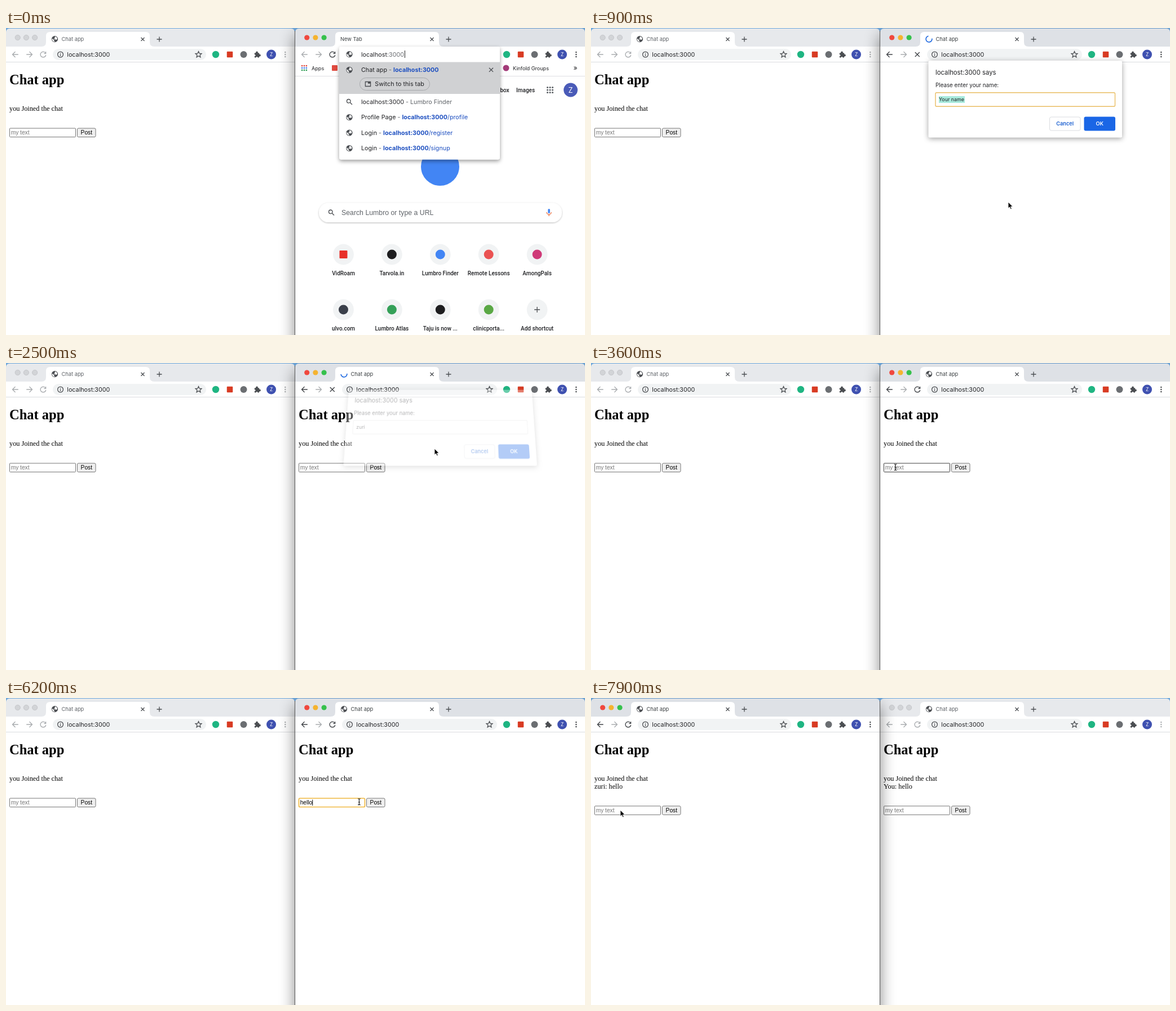
Recreate the animation shown at these times as an HTML page. Size 1027x545 px, loop 8000 ms.

```html
<!DOCTYPE html>
<html lang="en">
<head>
<meta charset="utf-8">
<title>Chat app</title>
<style>
html, body { margin: 0; width: 100%; height: 100%; overflow: hidden; background: #6fa8dc; }
svg { position: absolute; left: 0; top: 0; display: block; }
text { font-family: Inter, "Open Sans", sans-serif; fill: #202124; }
.serif { font: 12.26px "Liberation Serif", serif; fill: #000; }
.h1 { font-size: 24.5px; font-weight: 700; }
.form { font: 10.2px "Liberation Sans", sans-serif; fill: #000; }
.hint { fill: #757575; }
.tile { font: 500 10px Roboto, sans-serif; }
.query { font: 12.3px "Liberation Sans", sans-serif; fill: #5f6368; }
.url { font-size: 10.75px; }
.mark { font-size: 9.1px; }
.tab { font-size: 9.3px; fill: var(--title); }
.mid { text-anchor: middle; }
.win { --ink: #a7aaad; --strip: #e7e9ec; --title: #5f6368; --edge: #bfc1c4;
  --red: #d2d4d7; --yellow: #d2d4d7; --green: #d2d4d7; }
.win.on { --ink: #3f4246; --strip: #dee1e6; --title: #3c4043; --edge: none;
  --red: #f0483e; --yellow: #f5b32f; --green: #36c14c; }
.line { fill: none; stroke: #4a4d51; stroke-width: 1.3; }
.ink { stroke: var(--ink); }
.pale { stroke: #a9acaf; }
#dialog { left: 598px; top: 58px; overflow: visible; transform-origin: 50% 100%;
  filter: drop-shadow(0 2px 5px rgba(0,0,0,.38)); }
</style>
</head>
<body>
<svg id="stage" width="1027" height="545" viewBox="0 0 1027 545">
  <defs>
    <filter id="blur" filterUnits="userSpaceOnUse" x="-80" y="-80" width="1200" height="860">
      <feGaussianBlur stdDeviation="14"/>
    </filter>
    <filter id="soft" x="-10%" y="-20%" width="120%" height="150%">
      <feDropShadow dx="0" dy="1" stdDeviation="1.6" flood-opacity=".28"/>
    </filter>
    <filter id="lift" x="-10%" y="-10%" width="120%" height="125%">
      <feDropShadow dx="0" dy="3" stdDeviation="3.5" flood-opacity=".4"/>
    </filter>
    <g id="globe">
      <circle r="5.6" fill="#4a4d51"/>
      <path d="M-4.5-1.2l3 2.8v1.1l1.4 1v1A4.6 4.6 0 0 1-4.5-1.2zM.8-4.5q2.8.8 3.6 3.2l-.9 2.6-2.5-.6h-2.3V-.9h2l-1.1-1.5z" fill="#fff"/>
    </g>
    <g id="lens" class="line"><circle cx="-1.2" cy="-1.2" r="3.3"/><path d="M1.3 1.3L5 5"/></g>
  </defs>
  <rect id="shadow" y="14" width="513" height="720" opacity=".5" filter="url(#blur)"/>
  <path id="seam" d="M512.5 5V545" stroke="#555" fill="none"/>
</svg>
<svg id="dialog" width="344" height="137" viewBox="598 58 344 137"></svg>
<svg id="pointer" width="1027" height="545" viewBox="0 0 1027 545">
  <path id="arrow" d="M0 0V11.2L2.6 8.8 4.4 12.8 6.3 12 4.6 8.1H8.2Z" fill="#000" stroke="#fff" stroke-width=".9"/>
  <path id="beam" d="M-2.3-5.5Q0-5.5 0-4V4Q0 5.5-2.3 5.5M2.3-5.5Q0-5.5 0-4M0 4Q0 5.5 2.3 5.5M-1.3.8H1.3" fill="none" stroke="#111" stroke-width="1.1"/>
</svg>
<script>
const LOOP = 8000, STEP = 100, DX = 513;
const $ = id => document.getElementById(id);
const show = (el, on) => { el.style.display = on ? '' : 'none'; };
const set = (el, attrs) => { for (const k in attrs) el.setAttribute(k, attrs[k]); };
const clamp = v => Math.min(1, Math.max(0, v));
const span = (t, a, b) => clamp((t - a) / (b - a));
const smooth = p => p * p * (3 - 2 * p);
const shift = (x, y) => `matrix(1, 0, 0, 1, ${x}, ${y})`;

// Markup helpers
const text = (x, y, s, cls = '', extra = '') => `<text x="${x}" y="${y}" class="${cls}" ${extra}>${s}</text>`;
const icon = (x, y, d, cls = 'line', extra = '') => `<path transform="${shift(x, y)}" d="${d}" class="${cls}" ${extra}/>`;
const use = (x, y, id, extra = '') => `<use href="#${id}" x="${x}" y="${y}" ${extra}/>`;
const dot = (x, y, r, fill, extra = '') => `<circle cx="${x}" cy="${y}" r="${r}" fill="${fill}" ${extra}/>`;
const box = (x, y, w, h, fill, extra = '') => `<rect x="${x}" y="${y}" width="${w}" height="${h}" fill="${fill}" ${extra}/>`;
const chip = (x, y, s, fill) => box(x - s / 2, y - s / 2, s, s, fill, 'rx="1"');
const grid = (x, y, gap, r, fill) => [...Array(9)].map((_, i) =>
  dot(x + (i % 3 - 1) * gap, y + (Math.floor(i / 3) - 1) * gap, r, fill(i))).join('');

const CROSS = 'M-4-4L4 4M4-4L-4 4', PLUS = 'M-5 0H5M0-5V5';
const BACK = 'M5.3 0H-5M0-5L-5 0 0 5', FORWARD = 'M-5.3 0H5M0-5L5 0 0 5';
const RELOAD = 'M4-2.8A4.9 4.9 0 1 0 4.8 1M4.6-5V-1.6H1.2';
const STAR = 'M0-5.4L1.6-1.8 5.4-1.5 2.5 1 3.4 4.8 0 2.7-3.4 4.8-2.5 1-5.4-1.5-1.6-1.8Z';

function puzzle(x) {
  return `<g transform="${shift(x, 47)}" fill="#4a4d51">${box(-5.2, -2.8, 8.4, 8.4, '#4a4d51', 'rx="1"')}` +
    `<circle cx="-1" cy="-3.4" r="2"/><circle cx="3.8" cy="1.4" r="2"/>` +
    `${dot(-5, 1.4, 1.5, '#fff')}${dot(-1, 5.5, 1.5, '#fff')}</g>`;
}

function windowMarkup(key, w, s) {
  const lights = ['red', 'yellow', 'green'].map((c, i) =>
    dot(20.7 + i * 15.2, 17, 4.6, `var(--${c})`, 'stroke="var(--edge)" stroke-width=".8"')).join('');
  return box(0, 1, w, 570, 'var(--strip)', 'rx="6"') + lights +
    `<path d="M63 33q8 0 8-8V14q0-7 7-7h170q7 0 7 7v11q0 8 8 8z" fill="#fff"/>` +
    use(86.5, 19.6, 'globe', `id="${key}Icon"`) + text(98.5, 23, 'Chat app', 'tab', `id="${key}Title"`) +
    icon(242.5, 20, 'M-3-3L3 3M3-3L-3 3') + icon(272, 20, 'M-4.5 0H4.5M0-4.5V4.5') +
    box(0, 33, w, 520, '#fff') + box(0, 60, w, 1, '#d9dbde') +
    icon(16.5, 47, BACK, 'line ink', `id="${key}Back"`) + icon(41.5, 47, FORWARD, 'line pale') +
    icon(66, 47, RELOAD, 'line ink', `id="${key}Reload"`) + icon(65.8, 47, CROSS, 'line ink', `id="${key}Stop" style="display:none"`) +
    box(83, 37, 272 + s, 20, '#f1f3f4', 'rx="10"') +
    dot(96.5, 47, 4.9, 'none', 'class="line"') + icon(96.5, 47, 'M0-.6V2.7M0-2.7V-1.5') +
    text(108.3, 50.8, 'localhost:3000', 'url') + icon(341.5 + s, 47, STAR) +
    dot(372 + s, 47, 6.2, '#1fb582') + chip(397 + s, 47, 10.5, '#d83b23') + dot(421.5 + s, 47, 6, '#6b6e72') +
    puzzle(446 + s) + dot(470.5 + s, 47, 8.5, '#3f51b0') +
    text(470.5 + s, 50, 'Z', 'mid', 'font-size="8.3" style="fill:#fff"') +
    [-4, 0, 4].map(d => dot(495.3 + s, 47 + d, 1.2, 'var(--ink)')).join('') +
    `<g id="${key}Page">` + text(6, 99.5, 'Chat app', 'serif h1') + text(6, 147, 'you Joined the chat', 'serif') +
    text(6, 161, key === 'left' ? 'zuri: hello' : 'You: hello', 'serif', `id="${key}Note"`) +
    `<g id="${key}Form">` + box(6.5, 178, 117, 15.5, '#fff', `id="${key}Field" stroke="#767676" rx="1"`) +
    text(8.7, 189, 'my text', 'form hint', `id="${key}Value"`) +
    `<path id="${key}Caret" d="M0 180.5V191" stroke="#000" style="display:none"/>` +
    box(126.5, 178, 32.5, 15.5, '#efefef', 'stroke="#767676" rx="2"') + text(142.8, 189.2, 'Post', 'form mid') + '</g></g>';
}

// New tab page, in stage coordinates
function startPage() {
  const marks = [[583, 'Inbox', '#e04a3f'], [639, 'VidRoam', '#e8302a'], [707, 'Plans', '#34a058'],
    [761, 'Brief', '#3f7de8'], [816, 'Interpret', '#4a84ea'], [887, 'Kinfold Groups', '#a33a78']];
  const tiles = [['VidRoam', '#e8302a'], ['Tarvola.in', '#1d1d1f'], ['Lumbro Finder', '#4285f4'],
    ['Remote Lessons', '#ea5252'], ['AmongPals', '#cf3a78'], ['ulvo.com', '#3a3f4a'],
    ['Lumbro Atlas', '#34a058'], ['Taju is now ...', '#1d1d1f'], ['clinicporta...', '#5aa845'], ['Add shortcut', '']];
  const tone = i => ['#e2483d', '#4a84ea', '#34a058'][Math.floor(i / 3)];
  return box(513, 60, 514, 485, '#fff') + box(513, 85, 514, 1, '#dddfe2') +
    grid(529, 71, 3.9, 1.4, tone) + text(542, 74.5, 'Apps', 'mark') +
    marks.map(([x, s, c], i) => (i % 2 ? dot(x, 71, 5.5, c) : chip(x, 71, 10, c)) + text(x + 12, 74.5, s, 'mark')).join('') +
    text(1010, 75, '»', 'mid', 'font-size="12"') +
    text(868, 113.5, 'Inbox', 'tile') + text(905, 113.5, 'Images', 'tile') +
    grid(965, 110, 4.5, 1.6, () => '#5f6368') + dot(1001.5, 110, 12.4, '#4a5bb8') +
    text(1001.5, 114.5, 'Z', 'mid', 'font-size="12.5" style="fill:#fff"') +
    dot(770, 246, 34, '#4285f4') +
    box(555, 310.5, 431, 34.5, '#fff', 'rx="17.2" filter="url(#soft)"') + use(577, 327.5, 'lens') +
    text(595, 331.5, 'Search Lumbro or type a URL', 'query') +
    box(961.3, 321, 3.6, 8, '#4285f4', 'rx="1.8"') +
    icon(963.1, 327, 'M-4 0A4 4 0 0 0 4 0M0 4V7', 'line', 'style="stroke:#ea6a3a"') +
    tiles.map(([s, c], i) => {
      const x = 598.5 + (i % 5) * 85.9, y = i < 5 ? 402 : 500;
      return dot(x, y, 18.4, '#f1f3f4') + (c ? (i ? dot(x, y, 8.5, c) : chip(x, y, 14, c)) : icon(x, y, PLUS)) +
        text(x, y + 36.7, s, 'tile mid');
    }).join('');
}

function suggestions() {
  const blue = (s, w) => `<tspan fill="#1d4fc0" font-weight="${w}">${s}</tspan>`;
  const row = (y, name, path) => use(609, y, 'globe') +
    text(630, y + 3.8, `${name} <tspan fill="#5f6368">-</tspan> ${blue('localhost:3000', 700)}${blue(path, 400)}`, 'url');
  return box(591, 33, 285, 200.5, '#fff', 'rx="4" filter="url(#lift)"') + use(609, 46.6, 'globe') +
    text(630, 50.8, 'localhost<tspan fill="#6a6d71">:3000</tspan>', 'url') + box(707, 40, 1, 13, '#222') +
    box(591, 60.5, 285, 56.5, '#d0d1d3') + row(74.3, 'Chat app', '') +
    icon(860.5, 74.3, 'M-3.6-3.6L3.6 3.6M3.6-3.6L-3.6 3.6') +
    box(627.5, 88.5, 124, 22, 'none', 'rx="11" stroke="#a6a8ab"') +
    icon(642, 99.5, 'M-4.6-4H4.6V4H-4.6Z') + box(642, 95.5, 4.6, 3.2, '#4a4d51') + text(654.3, 103.3, 'Switch to this tab', 'url') +
    use(609, 131, 'lens') +
    text(630, 134.8, 'localhost:3000 <tspan fill="#5f6368">- Lumbro Finder</tspan>', 'url') +
    row(158.5, 'Profile Page', '/profile') + row(186, 'Login', '/register') + row(213.5, 'Login', '/signup');
}

function group(id, markup, attrs = {}) {
  const g = document.createElementNS('http://www.w3.org/2000/svg', 'g');
  g.id = id;
  set(g, attrs);
  g.innerHTML = markup;
  $('stage').append(g);
  return g;
}

const left = group('left', windowMarkup('left', 512, 0), { class: 'win' });
const right = group('right', windowMarkup('right', 514, 3) +
  '<path id="spinner" fill="none" stroke="#1a66e0" stroke-width="1.6"/>',
  { class: 'win', transform: shift(DX, 0) });
const tabPage = group('tabPage', startPage());
const menu = group('menu', suggestions());

$('dialog').innerHTML = box(598.5, 58, 343.5, 136.5, '#fff', 'rx="2.5"') +
  text(611, 82.5, 'localhost:3000 says', '', 'font-size="11.3"') +
  text(611, 104.7, 'Please enter your name:', '', 'font-size="9.8"') +
  box(611, 114.8, 318.5, 24.4, '#fff', 'id="nameBox" rx="2" stroke="#e9bd62" stroke-width="1.4"') +
  box(617, 121, 46, 12, '#a8eadc', 'id="picked"') + text(617, 130.2, '', '', 'id="name" font-size="8.9"') +
  box(813.5, 158, 54.5, 24, '#fff', 'rx="3" stroke="#dadce0"') +
  text(840.7, 173.3, 'Cancel', 'mid', 'font-size="9.2" font-weight="600" style="fill:#1a5fd0"') +
  box(874.5, 157.5, 55.5, 25, '#1a66e6', 'rx="3"') +
  text(902.2, 173.3, 'OK', 'mid', 'font-size="9.2" font-weight="600" style="fill:#fff"');

const typed = (word, times, t) => word.slice(0, times.filter(k => t >= k).length);
const NAME_KEYS = [1600, 1800, 1900, 2100], TEXT_KEYS = [4200, 4600, 4900, 5000, 5200];

// Arc that grows and shrinks by 270 degrees while it turns
function spinnerPath(t) {
  const u = t - 250, turn = 1333, half = turn / 2, v = u % turn;
  const head = 270 * smooth(clamp(v / half)), tail = 270 * smooth(clamp(v / half - 1));
  const base = 235 + 270 * Math.floor(u / turn) + (t - 400) / 1568 * 360;
  const at = deg => {
    const a = (base + deg) * Math.PI / 180;
    return `${86.5 + 5.4 * Math.cos(a)} ${19.6 + 5.4 * Math.sin(a)}`;
  };
  return `M${at(tail)}A5.4 5.4 0 ${head - tail > 180 ? 1 : 0} 1 ${at(head)}`;
}

function cursorAt(t) {
  const moves = [
    [1000, 1500, 740, 309, 760, 152, 0, smooth],
    [2900, 3500, 760, 152, 540, 185, 45, smooth],
    [6000, 6600, 540, 185, 654, 184, 0, p => 1 - (1 - p) ** 3.5],
    [6900, 7350, 654, 184, 52, 199, 0, smooth]];
  const [a, b, x0, y0, x1, y1, sag, ease] = moves.filter(m => t >= m[0]).pop() || moves[0];
  const p = ease(span(t, a, b));
  return [x0 + (x1 - x0) * p, y0 + (y1 - y0) * p + sag * Math.sin(Math.PI * p)];
}

let front;
function raise(win) {
  if (front === win) return;
  front = win;
  const back = win === left ? right : left;
  win.classList.add('on');
  back.classList.remove('on');
  set($('shadow'), { x: win === left ? -1 : DX });
  $('stage').append(back, $('shadow'), win, $('seam'), tabPage, menu);
}

function drawDialog(t) {
  const p = t < 1500 ? 1 - span(t, 600, 800) : span(t, 2400, 2550);
  const name = typed('zuri', NAME_KEYS, t);
  show($('dialog'), p < 1);
  $('dialog').style.opacity = 1 - p;
  $('dialog').style.transform = p ?
    `${shift(0, -18 * p)} perspective(800px) rotateX(${27 * p}deg) scaleY(${1 + .15 * p})` : 'none';
  $('name').textContent = name || 'Your name';
  show($('picked'), !name);
  set($('nameBox'), { stroke: t >= 2400 ? '#e4e4e4' : '#e9bd62' });
}

function drawField(t, over) {
  const focus = t >= 3700 && t < 6800, value = focus ? typed('hello', TEXT_KEYS, t) : '';
  const field = $('rightField'), label = $('rightValue');
  label.textContent = value || 'my text';
  label.classList.toggle('hint', !value);
  set(field, { stroke: focus ? '#f0b83f' : over ? '#3c3c3c' : '#767676', 'stroke-width': focus ? 1.7 : 1, rx: focus ? 2 : 1 });
  const lastKey = [3700, ...TEXT_KEYS].filter(k => t >= k).pop();
  const lit = focus && Math.floor((t - lastKey) / 500) % 2 === 0;
  show($('rightCaret'), lit);
  if (lit) set($('rightCaret'), { transform: shift(9.2 + (value ? label.getComputedTextLength() : 0), 0) });
}

function draw(t) {
  const loading = t >= 250 && t < 2700, loaded = t >= 600, posted = t >= 6800;
  raise(t < 7400 ? right : left);
  show(menu, t < 200);
  show(tabPage, !loaded);

  $('rightTitle').textContent = loaded ? 'Chat app' : 'New Tab';
  set($('rightTitle'), { x: loaded ? 98.5 : loading ? 97 : 80 });
  show($('rightIcon'), loaded && !loading);
  show($('spinner'), loading);
  if (loading) set($('spinner'), { d: spinnerPath(t) });
  show($('rightStop'), loading);
  show($('rightReload'), !loading);
  set($('rightBack'), { class: loaded ? 'line ink' : 'line pale' });

  show($('rightPage'), t >= 2450);
  for (const key of ['left', 'right']) {
    show($(key + 'Note'), posted);
    set($(key + 'Form'), { transform: shift(0, posted ? 13.8 : 0) });
  }
  drawDialog(t);

  const [x, y] = cursorAt(t);
  const over = t >= 2700 && !posted && x > 519 && x < 636 && y > 177 && y < 194;
  const visible = loaded && !(t >= 4200 && t < 6000);
  drawField(t, over);
  show($('arrow'), visible && !over);
  show($('beam'), visible && over);
  set($(over ? 'beam' : 'arrow'), { transform: shift(x, y) });
}

const start = performance.now();
function tick() {
  const t = (performance.now() - start) % LOOP;
  draw(Math.floor(t / STEP) * STEP);
  requestAnimationFrame(tick);
}
tick();
</script>
</body>
</html>
```
